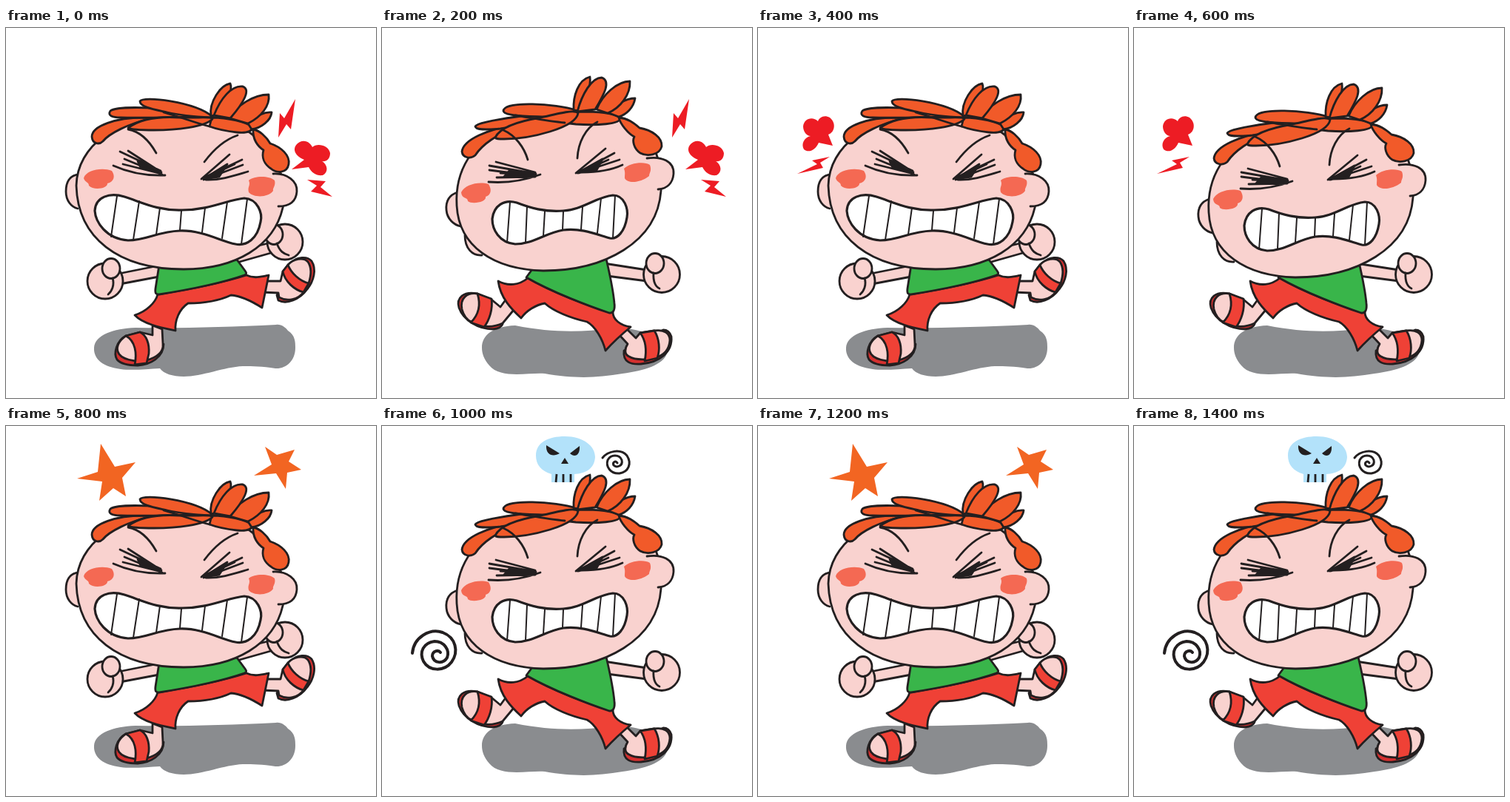
These frames come from a looping animation (500x500 px, 1600 ms). An HTML page:

```html
<!DOCTYPE html>
<html>
<head>
<meta charset="utf-8">
<title>Tantrum</title>
<style>
html, body { margin: 0; width: 100%; height: 100%; overflow: hidden; background: #fff; }
svg { display: block; width: 100%; height: 100%; }
path, circle, ellipse { stroke: #231f20; stroke-width: 2.8; stroke-linejoin: round; stroke-linecap: round; fill: none; }
.skin { fill: #f9d2cf; }
.hair path { fill: #f15a29; }
.hair .line { fill: none; }
.red { fill: #ef4136; }
.sole { fill: #d5302f; }
.green { fill: #39b54a; }
.white { fill: #fff; stroke-width: 3.2; }
.thin { stroke-width: 2; }
.ink { fill: #231f20; }
.shadow { stroke: none; fill: #8a8c8f; }
.cheek { stroke: none; fill: #f46953; }
.burst path { stroke: none; fill: #ed1c24; }
.stars path { stroke: none; fill: #f26522; }
.bone { stroke: none; fill: #b3e2fa; }
</style>
</head>
<body>
<svg viewBox="0 0 500 500">
<g id="kick">
  <path class="shadow" d="M119 432C120 415 145 406 175 405C240 406 300 404 365 401C372 400 378 405 381 409C391 415 391 425 391 432C391 450 378 461 364 460C345 457 335 457 320 457C295 458 265 471 240 471C225 471 213 467 208 460C190 461 170 463 155 461C132 458 118 448 119 432Z"/>
  <path class="skin" d="M305 303L358 290V304L312 317Z"/>
  <circle class="skin" cx="377" cy="289" r="24"/>
  <ellipse class="skin" cx="362" cy="279" rx="12" ry="13.5"/>
  <path d="M366 291C370 302 375 305 382 307"/>
  <path class="skin" d="M152 332L207 321V336L154 346"/>
  <circle class="skin" cx="134" cy="342" r="24"/>
  <ellipse class="skin" cx="142" cy="325" rx="12" ry="13.5"/>
  <path d="M144 338C147 347 143 356 138 360"/>
  <path class="sole" d="M162 416C149 423 145 440 150 448C156 455 167 456 178 456C195 455 213 445 213 427Z"/>
  <path class="skin" d="M198 402L198 415L181 411L162 416C153 422 149 430 151 437C154 448 175 452 190 449C205 445 213 437 212 427L211 407Z"/>
  <path class="red" d="M162 416L181 411C190 415 194 427 193 440L190 453L174 455C177 440 175 423 162 416Z"/>
  <path class="sole" d="M386 317C393 309 407 308 413 315C420 326 416 342 407 353C397 367 379 374 368 368L366 361Z"/>
  <path class="skin" d="M350 342H371L374 329L381 320C388 312 402 309 408 316C414 325 412 336 409 345L402 357C395 367 380 370 369 364L368 358L345 357Z"/>
  <path class="red" d="M374 329L381 320C385 331 397 342 409 345L402 357C390 354 377 343 374 329Z"/>
  <path class="red" d="M174 388C190 383 202 371 205 360C250 353 290 345 325 334C335 339 346 336 355 334L346 378C335 371 318 362 304 361C285 370 262 372 246 372C234 380 228 395 229 409C210 405 185 400 174 388Z"/>
  <path class="green" d="M207 320L202 352C201 359 203 360 207 360C245 354 290 345 322 334C326 332 325 331 323 328L312 313Z"/>
  <path class="skin" d="M100 198C85 198 81 210 81 221C81 233 88 242 97 244"/>
  <path class="skin" d="M95 213C96 160 150 118 230 118C310 118 345 140 365 190C380 200 378 230 374 243C362 295 310 326 240 326C152 326 97 284 95 213Z"/>
  <path class="skin" d="M361 197C380 196 394 207 393 221C392 235 383 241 368 241"/>
  <path class="cheek" d="M105 203C108 192 130 188 143 193C148 200 146 208 137 210C138 217 118 220 112 213C112 208 107 209 105 203Z"/>
  <path class="cheek" d="M328 206C335 200 355 199 363 206C365 213 360 216 361 220C355 229 335 230 328 222C326 214 331 213 328 206Z"/>
  <g class="hair">
    <path d="M185 121C150 121 116 132 116 147C117 157 126 158 131 153C140 142 165 130 195 122Z"/>
    <path d="M275 119C235 107 150 104 141 112C137 118 143 121 155 121C190 122 240 120 275 119Z"/>
    <path d="M278 119C255 100 185 91 181 99C181 107 200 110 218 114C240 119 260 120 278 121Z"/>
    <path d="M278 121C300 121 325 127 334 134C332 141 322 142 312 141C295 139 283 136 275 133Z"/>
    <path d="M165 135C180 124 205 119 235 121C260 122 277 119 279 123C268 134 230 138 200 138C180 138 168 137 165 135Z"/>
    <path class="line" d="M213 114C235 120 255 128 275 133"/>
    <path d="M327 129C338 118 350 113 359 114C358 125 345 135 332 137Z"/>
    <path d="M303 122C310 105 335 90 355 90C357 105 345 120 327 129Z"/>
    <path d="M277 119C274 100 290 77 303 75C307 83 298 105 283 118Z"/>
    <path d="M281 118C290 95 305 77 320 79C331 83 322 100 303 122Z"/>
    <path d="M334 137C342 138 352 147 357 156C372 161 384 172 382 184C380 196 366 197 358 190C349 184 345 175 348 165C340 160 333 150 334 137Z"/>
  </g>
  <path d="M165 137C182 140 194 153 203 169M268 181C280 165 295 151 313 145"/>
  <path d="M145 186C165 195 190 200 215 199M154 167L209 193M165 166L210 195M160 177L211 198M158 184L210 197M264 204L302 171M266 203L319 178M267 205L320 185M270 205C290 206 310 199 327 194M275 200L309 184"/>
  <path class="ink" d="M178 180L209 196L182 189ZM267 204L299 184L288 201Z"/>
  <path class="white" d="M120 247C121 228 140 222 160 228C185 236 205 247 238 246C275 246 300 232 322 230C340 231 347 250 344 262C340 285 325 295 310 292C290 288 265 273 235 274C205 275 190 287 165 287C135 285 121 262 120 247Z"/>
  <path class="thin" d="M150 227L142 282M180 234L172 286M208 243L203 279M237 247L235 273M269 243L265 276M299 235L292 284M326 231L318 292"/>
</g>

<g id="stomp">
  <path class="shadow" d="M135 432C135 415 150 403 180 402C230 412 270 411 310 406C350 403 385 420 385 440C380 455 355 463 325 467C290 473 260 474 220 467C200 465 160 475 145 456C138 448 135 440 135 432Z"/>
  <path class="skin" d="M300 318L358 327V342L304 335"/>
  <circle class="skin" cx="378" cy="333" r="24.5"/>
  <ellipse class="skin" cx="369" cy="318" rx="12" ry="13.5"/>
  <path d="M367 331C366 343 370 350 375 352"/>
  <path class="sole" d="M129 359C110 355 100 365 104 378C110 395 130 407 150 407C158 406 162 403 163 400Z"/>
  <path class="skin" d="M168 366L160 377L148 367L129 359C115 357 105 365 108 380C111 391 116 395 121 397L138 403C148 404 157 402 163 399L178 381Z"/>
  <path class="red" d="M129 359L148 366C150 380 145 395 138 404L120 398C130 388 134 375 129 359Z"/>
  <path class="sole" d="M327 436C325 452 337 455 350 454C375 452 393 438 391 417C389 411 385 408 380 408Z"/>
  <path class="skin" d="M320 414L332 427C328 433 327 441 334 444C342 449 362 449 371 445C380 442 388 435 389 422C389 413 382 407 368 409L349 412L343 419L330 406Z"/>
  <path class="red" d="M349 412L368 409C375 420 376 435 372 446L355 450C358 435 357 423 349 412Z"/>
  <path class="red" d="M157 342C170 349 185 348 197 338C230 357 280 377 312 384C312 394 322 402 336 404C325 413 312 425 302 436C298 420 288 403 277 397C255 392 232 383 220 372C208 374 195 382 188 392C175 380 160 365 157 342Z"/>
  <path class="green" d="M206 322L195 337C230 357 280 376 307 385C313 386 315 380 314 372C312 350 307 330 303 312Z"/>
  <g id="head">
    <path class="skin" d="M112 280C112 298 122 308 135 307"/>
    <path class="skin" d="M102 222C90 226 86 235 87 246C88 258 97 266 106 268"/>
    <path class="skin" d="M101 240C98 190 125 155 160 138C200 118 290 112 330 125C370 140 380 190 377 220C372 290 300 328 218 328C150 326 104 295 101 240Z"/>
    <path class="skin" d="M358 176C378 173 395 180 394 197C393 210 385 217 373 218"/>
    <path class="cheek" d="M107 222C112 212 130 207 144 211C149 219 147 226 140 228C142 235 122 239 116 234C116 228 108 232 107 222Z"/>
    <path class="cheek" d="M327 190C335 182 355 180 362 185C365 193 361 196 361 200C350 209 332 211 328 203C328 197 329 196 327 190Z"/>
    <g class="hair">
      <path d="M175 132C145 137 110 150 108 167C109 176 120 177 126 172C135 158 155 143 185 133Z"/>
      <path d="M262 113C225 113 130 125 126 133C127 139 145 137 160 136C200 130 235 122 262 113Z"/>
      <path d="M262 111C235 102 165 98 164 112C165 119 195 119 220 120C240 119 255 115 262 113Z"/>
      <path d="M264 113C290 113 315 114 322 122C322 130 290 132 262 130L245 128Z"/>
      <path d="M153 148C160 133 190 125 215 121C240 115 260 110 265 115C262 135 200 150 165 150C157 150 154 150 153 148Z"/>
      <path class="line" d="M180 118C205 122 225 126 247 128"/>
      <path d="M307 115C315 103 330 95 342 95C340 108 330 117 320 120Z"/>
      <path d="M290 110C298 90 318 72 335 72C336 90 322 108 305 115Z"/>
      <path d="M259 111C258 92 265 70 281 66C283 80 275 95 265 112Z"/>
      <path d="M264 113C270 90 283 67 297 67C310 72 300 90 288 110Z"/>
      <path d="M320 121C332 122 340 128 348 135C365 138 379 148 378 160C375 172 358 174 349 169C340 163 338 152 341 147C333 143 322 130 320 121Z"/>
    </g>
    <path d="M164 138C180 145 192 161 197 178M264 176C265 155 275 135 291 127"/>
    <path d="M154 181L207 195M145 186L208 197M145 192L208 200M144 208C170 210 195 205 214 198M155 202L207 201M160 196L205 198M262 196L302 163M264 196L314 169M266 196L321 178M270 195C290 195 310 192 325 185M275 192L306 178"/>
    <path class="ink" d="M172 193L207 198L165 201ZM266 195L298 177L290 192Z"/>
    <path class="white" d="M149 258C151 240 165 231 182 236C200 243 220 249 245 247C270 246 290 228 312 226C328 226 333 245 331 256C328 275 318 286 308 284C290 279 270 270 245 273C220 277 205 292 180 292C158 290 149 272 149 258Z"/>
    <path class="thin" d="M173 235L169 290M196 241L194 290M220 248L218 281M245 248L244 273M271 242L269 272M296 230L291 277M315 226L312 284"/>
  </g>
</g>

<g id="right" class="burst">
  <path d="M391 96L376 122L370 115L368 148L379 130L385 137Z"/>
  <path d="M386 191L403 178C388 172 386 160 397 154C405 150 412 156 414 161C420 155 436 158 438 169C438 178 432 181 427 180C435 185 436 195 428 199C420 200 413 196 409 188Z"/>
  <path d="M407 205L432 207L425 215L441 228L412 221L420 213Z"/>
</g>
<g id="left" class="burst">
  <path d="M101 159L95 144C104 141 106 128 97 121C89 117 83 121 81 126C74 119 62 122 61 133C61 140 66 146 71 146C62 148 58 157 62 164C68 169 77 166 82 155Z"/>
  <path d="M97 174L73 179L80 184L53 197L88 189L84 182Z"/>
</g>
<g id="stars" class="stars">
  <path d="M128 24L147 55L175 49L157 70L162 95L145 84L126 101L130 75L96 71L124 62Z"/>
  <path d="M350 28L366 39L390 32L382 48L399 59L380 63L378 85L365 64L335 67L359 52Z"/>
</g>
<g id="skull">
  <path class="bone" d="M208 40C208 22 225 14 247 14C272 14 288 27 288 42C287 58 275 64 260 65V76H229V65C215 61 208 52 208 40Z"/>
  <path class="ink" stroke="none" style="stroke:none" d="M222 26L240 37C232 42 221 40 222 26ZM267 27L254 37C260 43 268 40 267 27ZM247 43L242 51H252Z"/>
  <path style="stroke-linecap:butt" d="M236 65L235 76M245 65V76M255 65V76"/>
  <path style="stroke-width:4" d="M41 307C43 285 65 273 82 279C100 286 104 305 94 319C84 332 64 332 56 318C50 305 56 293 71 291C84 291 92 303 88 313C83 322 70 321 68 311C68 304 76 302 79 306"/>
  <path style="stroke-width:3" d="M298 43C305 34 322 30 331 40C338 51 333 62 321 64C309 65 302 55 305 46C309 38 321 38 324 46C326 54 317 57 313 53C311 49 316 46 318 50"/>
</g>
</svg>
<script>
const STEP = 200;
const parts = ['kick', 'stomp', 'right', 'left', 'stars', 'skull'];
const el = id => document.getElementById(id);
// pose, mark, sideways shift of the mark, head drop
const beats = [
  ['kick', 'right', 0, 0],
  ['stomp', 'right', 24, 0],
  ['kick', 'left', 0, 0],
  ['stomp', 'left', -22, 9],
  ['kick', 'stars', 0, 0],
  ['stomp', 'skull', 0, 0],
  ['kick', 'stars', 0, 0],
  ['stomp', 'skull', 0, 0]
];

function draw(time) {
  const [pose, mark, shift, drop] = beats[Math.floor(time / STEP) % beats.length];
  for (const id of parts)
    el(id).style.display = id === pose || id === mark ? '' : 'none';
  el(mark).setAttribute('transform', `translate(${shift} 0)`);
  el('head').setAttribute('transform', `translate(0 ${drop})`);
}

const start = performance.now();
function tick() {
  draw(performance.now() - start);
  requestAnimationFrame(tick);
}
tick();
</script>
</body>
</html>
```
